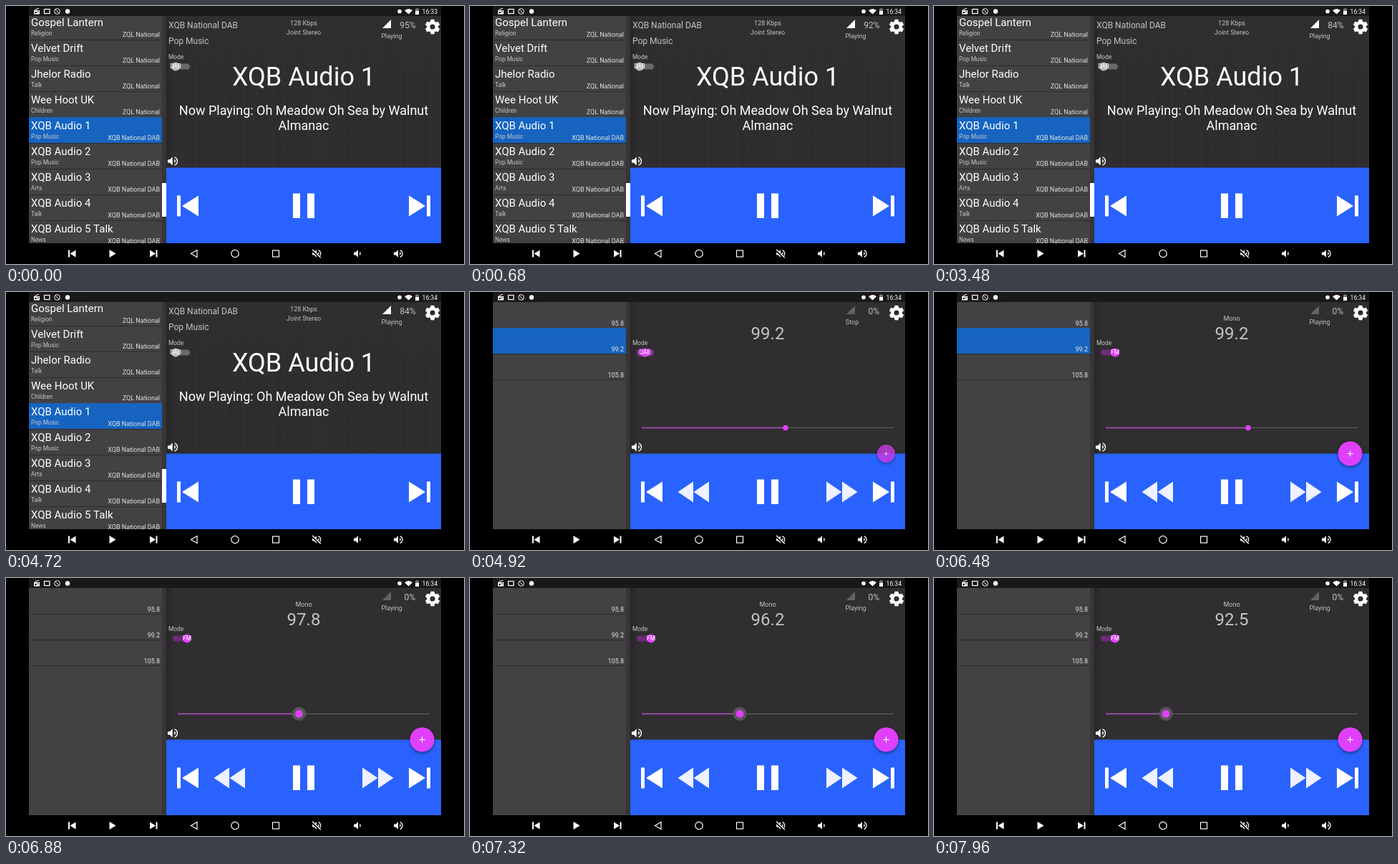
Animation of 640x360 px, one loop 8 s. Source, as an HTML page with a canvas:

```html
<!DOCTYPE html>
<html lang="en">
<head>
<meta charset="utf-8">
<title>Radio player</title>
<style>
html, body { margin: 0; width: 100%; height: 100%; overflow: hidden; background: #000; }
canvas { display: block; width: 640px; height: 360px; }
</style>
</head>
<body>
<canvas id="stage" width="640" height="360"></canvas>
<script>
const ctx = document.getElementById('stage').getContext('2d');
const LOOP = 8000, STEP = 40;
const SWITCH_AT = 4800, FAB_AT = 4840, PLAY_AT = 5200, MONO_AT = 5400, DRAG_AT = 6480;
const PINK = '#e040fb', WHITE = '#fff', SOFT = '#c4c3c4', PANEL = '#302e30', LIST = '#434143';
const DECK_TOP = 225.6;
const LOCAL = 'ZQL National', NATIONAL = 'XQB National DAB';
const STATIONS = [
  ['Gospel Lantern', 'Religion', LOCAL],
  ['Velvet Drift', 'Pop Music', LOCAL],
  ['Jhelor Radio', 'Talk', LOCAL],
  ['Wee Hoot UK', 'Children', LOCAL],
  ['XQB Audio 1', 'Pop Music', NATIONAL],
  ['XQB Audio 2', 'Pop Music', NATIONAL],
  ['XQB Audio 3', 'Arts', NATIONAL],
  ['XQB Audio 4', 'Talk', NATIONAL],
  ['XQB Audio 5 Talk', 'News', NATIONAL]
];

const clamp = v => Math.max(0, Math.min(1, v));
const mix = (a, b, k) => a + (b - a) * k;
const ease = k => (1 - Math.cos(Math.PI * k)) / 2;

// Linear interpolation through [time, value] pairs.
function track(t, keys) {
  for (let i = 1; i < keys.length; i++) {
    const [t0, a] = keys[i - 1], [t1, b] = keys[i];
    if (t <= t1) return mix(a, b, clamp((t - t0) / (t1 - t0)));
  }
  return keys[keys.length - 1][1];
}

function rect(x, y, w, h, color) {
  ctx.fillStyle = color;
  ctx.fillRect(x, y, w, h);
}

function disc(x, y, r, color) {
  ctx.fillStyle = color;
  ctx.beginPath();
  ctx.arc(x, y, r, 0, 7);
  ctx.fill();
}

function pill(x, y, w, h, color) {
  ctx.fillStyle = color;
  ctx.beginPath();
  ctx.roundRect(x, y, w, h, h / 2);
  ctx.fill();
}

function poly(color, ...pts) {
  ctx.fillStyle = color;
  ctx.beginPath();
  for (let i = 0; i < pts.length; i += 2) ctx.lineTo(pts[i], pts[i + 1]);
  ctx.fill();
}

function line(x0, y0, x1, y1, color, width = 1) {
  ctx.strokeStyle = color;
  ctx.lineWidth = width;
  ctx.beginPath();
  ctx.moveTo(x0, y0);
  ctx.lineTo(x1, y1);
  ctx.stroke();
}

// y is the middle of the capital letters.
function text(str, x, y, size, color = WHITE, align = 'left') {
  ctx.font = `${size}px Roboto, sans-serif`;
  ctx.textAlign = align;
  ctx.fillStyle = color;
  ctx.fillText(str, x, y + size * 0.355);
}

function arrow(x, y, w, h, dir, color = WHITE) {
  const base = dir > 0 ? x : x + w, tip = dir > 0 ? x + w : x;
  poly(color, base, y - h / 2, tip, y, base, y + h / 2);
}

function speaker(x, y, size, waves, muted) {
  ctx.save();
  ctx.translate(x, y);
  ctx.scale(size / 24, size / 24);
  poly(WHITE, -9, -3, -5, -3, 0, -8, 0, 8, -5, 3, -9, 3);
  ctx.strokeStyle = WHITE;
  ctx.lineWidth = 2;
  if (waves > 0) {
    ctx.fillStyle = WHITE;
    ctx.beginPath();
    ctx.arc(1.5, 0, 4, -1.1, 1.1);
    ctx.fill();
  }
  if (waves > 1) {
    ctx.beginPath();
    ctx.arc(1, 0, 8, -1.2, 1.2);
    ctx.stroke();
  }
  if (muted) {
    line(-10, -8, 9, 10, '#000', 5);
    line(-9, -9, 9, 9, WHITE, 2);
  }
  ctx.restore();
}

function gear(x, y) {
  ctx.save();
  ctx.translate(x, y);
  for (let i = 0; i < 6; i++) {
    ctx.rotate(Math.PI / 3);
    poly(WHITE, -3.4, -6, -2.4, -10.3, 2.4, -10.3, 3.4, -6);
  }
  disc(0, 0, 7.9, WHITE);
  disc(0, 0, 3.6, PANEL);
  ctx.restore();
}

function statusBar(t) {
  rect(32, 0, 576, 14, '#1a191a');
  rect(39, 6, 8, 5.5, WHITE);
  line(40, 5.5, 46, 3.2, WHITE);
  disc(41.5, 9, 1.2, '#000');
  rect(43.5, 7.5, 2.5, 1, '#000');
  ctx.strokeStyle = WHITE;
  ctx.lineWidth = 1.2;
  ctx.strokeRect(53.5, 4.5, 7.5, 6);
  ctx.lineWidth = 1;
  ctx.beginPath();
  ctx.arc(71.5, 7.5, 3.8, 0, 7);
  ctx.stroke();
  line(69.5, 5.5, 73.5, 9.5, WHITE);
  disc(86, 7.5, 3.2, WHITE);
  disc(550, 7.5, 2.8, WHITE);
  ctx.fillStyle = WHITE;
  ctx.beginPath();
  ctx.moveTo(562.5, 11.5);
  ctx.arc(562.5, 11.5, 7.5, -Math.PI * 0.76, -Math.PI * 0.24);
  ctx.fill();
  rect(573.5, 3, 2, 1, '#7c7b7c');
  rect(572, 4, 5, 3, '#7c7b7c');
  rect(572, 7, 5, 5, WHITE);
  text(t < 600 ? '16:33' : '16:34', 603, 7.5, 8.6, WHITE, 'right');
}

function navBar() {
  const y = 345.5;
  rect(87, y - 5, 2, 10, WHITE);
  arrow(89.5, y, 8, 10, -1);
  arrow(144.5, y, 9, 11, 1);
  arrow(201, y, 8, 10, 1);
  rect(209.5, y - 5, 2, 10, WHITE);
  ctx.strokeStyle = WHITE;
  ctx.lineWidth = 1.2;
  ctx.beginPath();
  ctx.moveTo(258.5, y);
  ctx.lineTo(267, y - 5);
  ctx.lineTo(267, y + 5);
  ctx.closePath();
  ctx.stroke();
  ctx.beginPath();
  ctx.arc(320, y, 5.2, 0, 7);
  ctx.stroke();
  ctx.strokeRect(372.5, y - 4.5, 9, 9);
  speaker(434, y, 15.5, 2, true);
  speaker(492, y, 16, 1);
  speaker(548, y, 16, 2);
}

function listRow(bottom, selected) {
  if (selected) rect(32, bottom - 36, 186, 36, '#1664c0');
  rect(32, bottom, 186, 1, '#2d2b2d');
}

function stationList() {
  STATIONS.forEach(([name, genre, network], i) => {
    const y = 23 + i * 36;
    listRow(y + 24, i === 4);
    text(name, 35, y, 15);
    text(genre, 35, y + 15.3, 8.3, SOFT);
    text(network, 215, y + 17, 9, '#e2e2e2', 'right');
  });
}

function frequencyList(t) {
  ['95.8', '99.2', '105.8'].forEach((freq, i) => {
    const bottom = 50 + i * 36;
    listRow(bottom, i === 1 && t <= DRAG_AT);
    text(freq, 215, bottom - 6.5, 9, '#e2e2e2', 'right');
  });
}

function streaks() {
  let seed = 7;
  const random = () => (seed = seed * 16807 % 2147483647) / 2147483647;
  const fade = ctx.createLinearGradient(0, 14, 0, 110);
  fade.addColorStop(0, 'rgba(16,15,16,0)');
  fade.addColorStop(1, 'rgb(16,15,16)');
  ctx.save();
  for (let x = 226; x < 607; x += 2 + Math.floor(random() * 4)) {
    ctx.globalAlpha = 0.05 + random() * 0.15;
    rect(x, 14, 1, DECK_TOP - 14, fade);
  }
  ctx.restore();
}

function modeSwitch(t) {
  const on = t >= SWITCH_AT, k = ease(clamp((t - SWITCH_AT) / 250));
  const x = mix(237, 253, k);
  text('Mode', 227, 71, 8.4, SOFT);
  pill(233, 80.5, 24, 8, on ? '#6b2d78' : '#6a696a');
  if (on && k < 1) pill(233, 78.5, 23, 12, 'rgba(224,64,251,.3)');
  disc(x, 84.5, 6, on ? PINK : '#bdbcbd');
  text(k > 0.6 ? 'FM' : 'DAB', x, 84.5, 8.4, WHITE, 'center');
}

function transport(fm) {
  const y = 279;
  rect(224, DECK_TOP, 384, 331 - DECK_TOP, '#2962ff');
  rect(239, y - 14.5, 5, 29, WHITE);
  arrow(246, y, 23, 29, -1);
  rect(401, 261.5, 10, 34.5, WHITE);
  rect(421, 261.5, 10, 34.5, WHITE);
  arrow(563, y, 23, 29, 1);
  rect(588, y - 14.5, 5, 29, WHITE);
  if (!fm) return;
  for (const x of [290.5, 312.5]) arrow(x, y, 21.5, 29, -1, '#eef2ff');
  for (const x of [498, 520]) arrow(x, y, 21.5, 29, 1, '#eef2ff');
}

function tuner(t) {
  const dragging = t > DRAG_AT;
  const x = track(t, [[6400, 441], [DRAG_AT, 439], [7320, 377], [7960, 324]]);
  const freq = track(t, [[DRAG_AT, 99.2], [7320, 96.2], [7960, 92.5]]);
  text(freq.toFixed(1), 416, 57.5, 24, SOFT, 'center');
  if (t >= MONO_AT) text('Mono', 416, 36.5, 9, SOFT, 'center');
  line(240, 189.5, 592, 189.5, '#656365', 1.2);
  line(240, 189.5, x, 189.5, '#b84fca', 1.4);
  const grow = clamp((t - DRAG_AT) / 120);
  if (dragging) disc(x, 189.5, mix(4, 9.7, grow), '#565556');
  disc(x, 189.5, mix(3.7, 5.4, grow), PINK);
}

function addButton(t) {
  const k = clamp((t - FAB_AT) / 200);
  if (!k) return;
  const size = 1 - (1 - k) ** 2.6;
  ctx.save();
  ctx.globalAlpha = size;
  ctx.translate(581.5, 225.5);
  ctx.scale(size, size);
  ctx.shadowColor = 'rgba(0,0,0,.45)';
  ctx.shadowBlur = 5;
  ctx.shadowOffsetY = 2;
  disc(0, 0, 17, PINK);
  ctx.shadowColor = 'transparent';
  line(-4, 0, 4, 0, WHITE, 1.2);
  line(0, -4, 0, 4, WHITE, 1.2);
  ctx.restore();
}

function stationInfo() {
  text(NATIONAL, 227, 26.5, 12, SOFT);
  text('Pop Music', 227, 48.5, 12, SOFT);
  text('128 Kbps', 416, 24, 9, SOFT, 'center');
  text('Joint Stereo', 416, 36.5, 9, SOFT, 'center');
  text('XQB Audio 1', 416, 98, 36, WHITE, 'center');
  text('Now Playing: Oh Meadow Oh Sea by Walnut', 416, 145.5, 18, WHITE, 'center');
  text('Almanac', 416, 166.5, 18, WHITE, 'center');
}

function reception(t, fm) {
  const level = fm ? 0 : t < 600 ? 95 : t < 3480 ? 92 : 84;
  poly(fm ? '#646264' : WHITE, 526, 31, 538, 19, 538, 31);
  text(level + '%', fm ? 572 : 572.5, 26.5, 12, SOFT, 'right');
  const stopped = fm && t < PLAY_AT;
  text(stopped ? 'Stop' : 'Playing', stopped ? 534 : 539, 41.5, 9, SOFT, 'center');
}

function draw(t) {
  const fm = t >= SWITCH_AT;
  rect(0, 0, 640, 360, '#000');

  ctx.save();
  ctx.beginPath();
  ctx.rect(32, 14, 576, 317);
  ctx.clip();
  rect(32, 14, 186, 317, LIST);
  if (fm) frequencyList(t);
  else stationList();
  rect(218, 14, 6, 317, '#373537');
  rect(224, 14, 384, 212, PANEL);
  const shade = ctx.createLinearGradient(224, 0, 234, 0);
  shade.addColorStop(0, 'rgba(0,0,0,.2)');
  shade.addColorStop(1, 'rgba(0,0,0,0)');
  rect(224, 14, 10, 212, shade);
  if (!fm) {
    streaks();
    rect(218, 247, 6, 47, WHITE);
  }
  transport(fm);
  if (fm) tuner(t);
  else stationInfo();
  reception(t, fm);
  modeSwitch(t);
  gear(596, 29);
  speaker(232.7, 216.5, 18, 2);
  addButton(t);
  ctx.restore();

  statusBar(t);
  navBar();
}

function frame() {
  const t = performance.now() % LOOP;
  draw(Math.floor(t / STEP) * STEP);
  requestAnimationFrame(frame);
}
frame();
</script>
</body>
</html>
```
